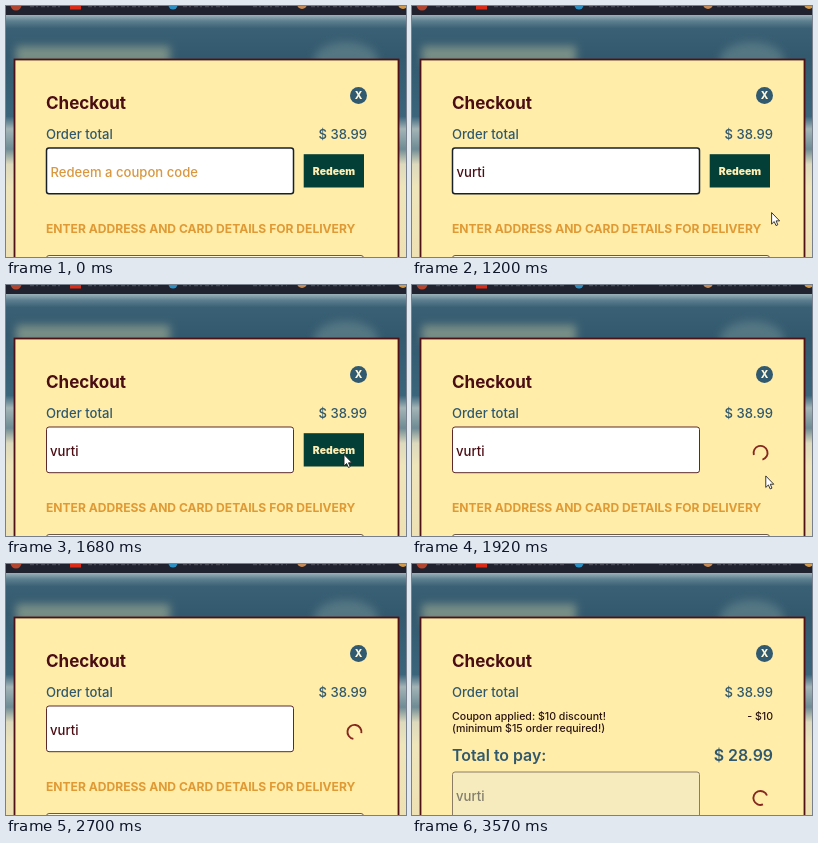
An HTML page for the animation above (3.6 s loop, 400 px wide and 251 px high).

```html
<!DOCTYPE html>
<html lang="en">
<head>
<meta charset="utf-8">
<title>Checkout</title>
<style>
  html, body { margin: 0; width: 100%; height: 100%; overflow: hidden; background: #ffeda9; }
  svg { display: block; width: 100vw; height: 100vh; }
  text { font: 500 13.1px Inter, sans-serif; fill: #31586c; white-space: pre; }
  .end { text-anchor: middle; }
  .right { text-anchor: end; }
  .note text { font-size: 10.6px; fill: #2a1512; }
  .sum text { font-size: 15.9px; font-weight: 600; }
</style>
</head>
<body>
<svg viewBox="0 0 400 251">
  <defs>
    <linearGradient id="page" x2="0" y2="1">
      <stop offset=".035" stop-color="#9db3bb"/>
      <stop offset=".06" stop-color="#5d7f8f"/>
      <stop offset=".09" stop-color="#3a6075"/>
      <stop offset=".2" stop-color="#33596e"/>
      <stop offset=".44" stop-color="#3a657b"/>
      <stop offset=".49" stop-color="#a3b4b6"/>
      <stop offset=".52" stop-color="#8fa5aa"/>
      <stop offset=".57" stop-color="#6f8b94"/>
      <stop offset=".63" stop-color="#dcd9bd"/>
      <stop offset=".72" stop-color="#efe5bb"/>
      <stop offset="1" stop-color="#eee2b4"/>
    </linearGradient>
    <filter id="soft" x="-30%" y="-60%" width="160%" height="220%"><feGaussianBlur stdDeviation="4"/></filter>
    <filter id="slight"><feGaussianBlur stdDeviation=".6"/></filter>
  </defs>

  <!-- blurred page and browser bar -->
  <rect width="400" height="251" fill="url(#page)"/>
  <g filter="url(#soft)">
    <rect x="10" y="40" width="154" height="18" fill="#a5b296" opacity=".6"/>
    <ellipse cx="340" cy="54" rx="32" ry="18" fill="#6f8f94" opacity=".55"/>
  </g>
  <rect width="400" height="9" fill="#20222f"/>
  <g filter="url(#slight)">
    <circle cx="10" cy="-1" r="5.5" fill="#b4452f"/>
    <rect x="64" y="-4" width="11" height="7.5" fill="#dc2c18"/>
    <circle cx="167" cy="-1" r="4.5" fill="#2c8fc4"/>
    <circle cx="296" cy="-2" r="5" fill="#c58a55"/>
    <circle cx="397" cy="-2" r="5" fill="#d39a4a"/>
    <path d="M24 .5H54M82 .5H152M177 .5H222M247 .5H281M305 .5H382" stroke="#777681" stroke-width="1.5" stroke-dasharray="4 2 2 3" opacity=".45"/>
  </g>

  <!-- dialog -->
  <rect x="8.5" y="53.5" width="384" height="210" fill="#ffeda9" stroke="#4f1016" stroke-width="1.8"/>
  <text x="40" y="102.5" style="font-size:17px;font-weight:700;fill:#4a0d14">Checkout</text>
  <circle cx="352.5" cy="89.5" r="8.5" fill="#31596f"/>
  <text class="end" x="352.5" y="93" style="font-size:10px;font-weight:800;fill:#fff6d8">X</text>
  <text x="40" y="132.5">Order total</text>
  <text class="right" x="361" y="132.5">$ 38.99</text>

  <g id="discount">
    <g class="note">
      <text x="40" y="155.5">Coupon applied: $10 discount!</text>
      <text x="40" y="168">(minimum $15 order required!)</text>
      <text class="right" x="361" y="155.5">- $10</text>
    </g>
    <g class="sum">
      <text x="40" y="197">Total to pay:</text>
      <text class="right" x="361" y="197">$ 28.99</text>
    </g>
  </g>

  <g id="form">
    <rect id="box" x="40.5" y="142" width="247" height="45.7" rx="2.5"/>
    <text id="code" y="170.5"></text>
    <rect id="caret" y="158" width="1" height="15" fill="#444"/>
    <g id="button">
      <rect x="297.7" y="148.2" width="60.3" height="33.3" fill="#043f37"/>
      <text class="end" x="328" y="168.5" style="font-size:10.4px;font-weight:900;fill:#ffefb4">Redeem</text>
    </g>
    <path id="spinner" d="M4.9-4.9A7 7 0 1 1-4.9-4.9" fill="none" stroke="#86281f" stroke-width="1.9"/>
    <text x="40" y="227" style="font-size:12.08px;font-weight:700;fill:#e09a35">ENTER ADDRESS AND CARD DETAILS FOR DELIVERY</text>
    <rect x="40.5" y="249.5" width="317" height="46" rx="2.5" fill="#fff8dd" stroke="#6b5a4c"/>
  </g>

  <g id="cursor" fill="#fff" stroke="#222" stroke-width=".9" stroke-linejoin="round">
    <path id="arrow" d="M0 0V11.5L2.6 9 4.4 13 6.2 12.2 4.5 8.3H8Z"/>
    <path id="hand" d="M-1.3 1Q0-1 1.3 1V5Q2.8 4 3.6 5.4 5 4.6 5.7 6 7.4 5.6 7.5 7.6V10.5L6.2 14H-.4L-4.2 9Q-4.4 7-2.6 7.4L-1.3 8.6Z"/>
  </g>
</svg>

<script>
const LOOP = 3600, WORD = 'vurti';
const KEYS = [60, 210, 390, 480, 660];
const BLUR = 1650, LOADING = 1740, DONE = 3210, SPIN = 950;
// cursor stops: time, x, y
const PATH = [[1110, 361, 213], [1440, 353.5, 178.5], [1650, 338, 169.5], [1800, 338, 169.5], [2160, 398, 251]];

const el = Object.fromEntries([...document.querySelectorAll('[id]')].map(e => [e.id, e]));
const show = (e, on) => e.style.display = on ? '' : 'none';
const set = (e, attrs) => { for (const k in attrs) e.setAttribute(k, attrs[k]); };

function cursorAt(t) {
  const i = PATH.findIndex((p, n) => n && t < p[0]);
  const [a, b] = [PATH[i - 1], PATH[i]];
  const u = (t - a[0]) / (b[0] - a[0]), s = u * u * (3 - 2 * u);
  return [a[1] + (b[1] - a[1]) * s, a[2] + (b[2] - a[2]) * s];
}

function draw(t) {
  const typed = WORD.slice(0, KEYS.filter(k => t >= k).length);
  const focus = t < BLUR, loading = t >= LOADING, done = t >= DONE;

  show(el.discount, done);
  set(el.form, { transform: `translate(0 ${done ? 66 : 0})` });
  set(el.box, {
    fill: done ? '#f5ebbd' : '#fff',
    stroke: focus ? '#17202b' : done ? '#8b7c66' : '#5d2a2c',
    'stroke-width': focus ? 1.5 : 1
  });

  el.code.textContent = typed || 'Redeem a coupon code';
  el.code.style.fill = !typed ? '#d9983f' : done ? '#827c6c' : '#4a0d14';
  set(el.code, { x: focus ? 44.5 : 44 });
  show(el.caret, typed && t < 1200);
  set(el.caret, { x: 44.5 + el.code.getComputedTextLength() });

  show(el.button, !loading);
  show(el.spinner, loading);
  const turn = (t - 2320) / SPIN * 360;
  set(el.spinner, { transform: `translate(348.5 168) rotate(${turn})` });

  const moving = t >= PATH[0][0] && t < PATH.at(-1)[0];
  show(el.cursor, moving);
  if (moving) {
    const [x, y] = cursorAt(t);
    const over = focus && x < 358 && y < 181.5;
    set(el.cursor, { transform: `translate(${x} ${y})` });
    show(el.hand, over);
    show(el.arrow, !over);
  }
}

const start = performance.now();
function frame() {
  draw((performance.now() - start) % LOOP);
  requestAnimationFrame(frame);
}
frame();
</script>
</body>
</html>
```
